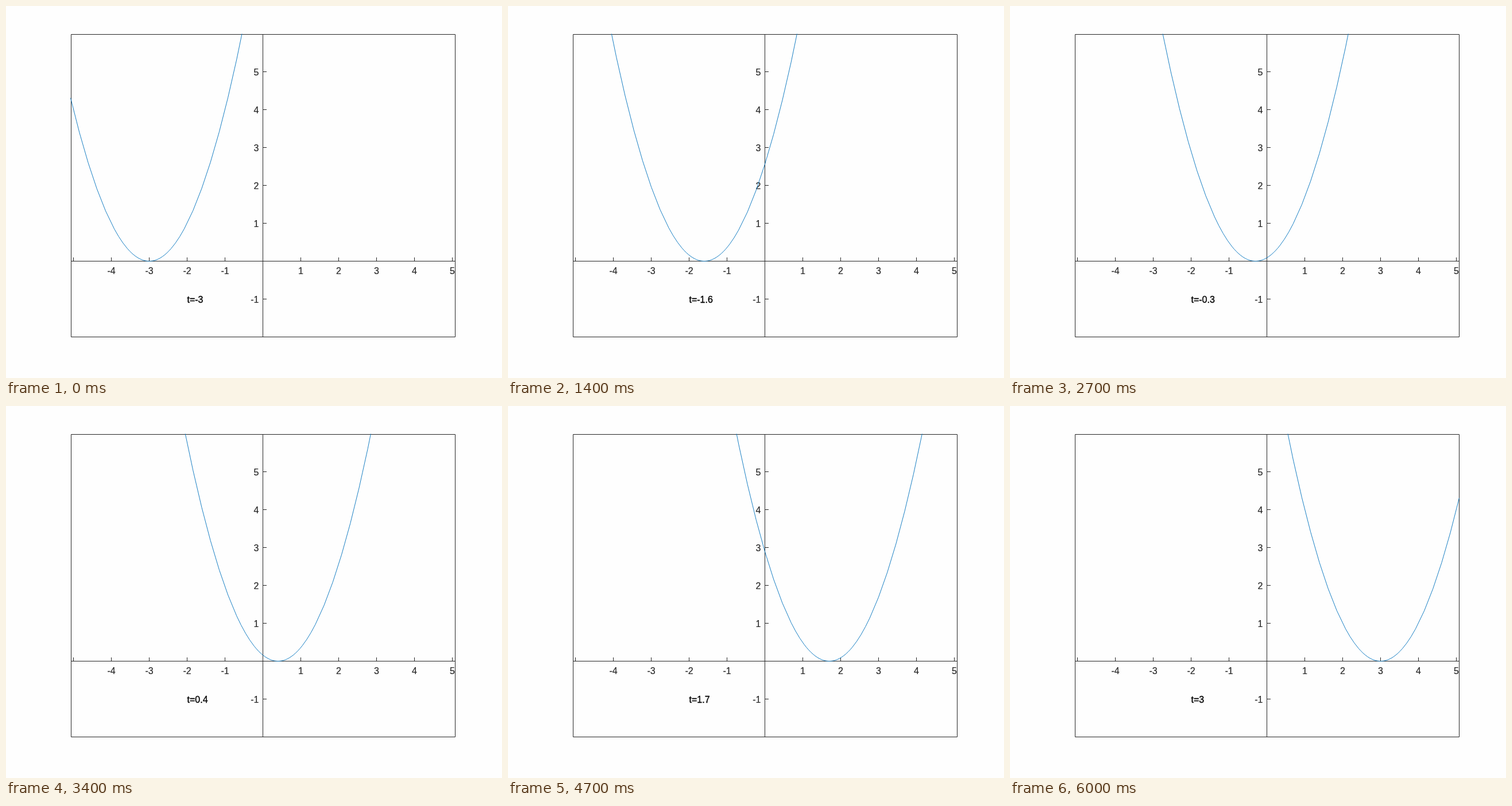
An HTML page that plays this animation: 864 by 648 pixels, repeating every 6.1 s.

```html
<!DOCTYPE html>
<html lang="en">
<head>
<meta charset="utf-8">
<title>Sliding parabola</title>
<style>
  html, body { margin: 0; width: 100%; height: 100%; overflow: hidden; background: #fefefe; }
  svg { display: block; }
  text { font: 16px "Liberation Sans", Arial, sans-serif; fill: #262626; stroke: #262626; stroke-width: 0.2; }
  #axes { fill: none; stroke: #262626; stroke-width: 1; }
  #curve { fill: none; stroke: #0072bd; stroke-width: 0.9; stroke-linejoin: round; }
  #label { fill: #000; stroke: #000; stroke-width: 0.35; }
</style>
</head>
<body>
<svg width="864" height="648" viewBox="0 0 864 648">
  <clipPath id="plot"><rect x="112" y="48.5" width="671" height="528"/></clipPath>
  <path id="axes"/>
  <g id="numbers"></g>
  <path id="curve" clip-path="url(#plot)"/>
  <text id="label" x="315.5" y="517"></text>
</svg>
<script>
const STEP = 100, STEPS = 61, UNIT = 66;
const LEFT = 113.5, RIGHT = 782.5, TOP = 49.5, BOTTOM = 576.5;
const HELD = [3, 8, 31];            // steps that repeat the one before
const REACH = 5.075;                // curve is sampled for |x| <= REACH
const CELLS = 44, MAX_TURN = 0.09;  // sampling grid and bend limit in radians
const $ = id => document.getElementById(id);
const px = x => 447.5 + x * UNIT;
const py = y => 444.5 - y * UNIT;

function addNumber(text, x, y, anchor) {
  const el = document.createElementNS("http://www.w3.org/2000/svg", "text");
  el.setAttribute("x", x);
  el.setAttribute("y", y);
  el.setAttribute("text-anchor", anchor);
  el.textContent = text;
  $("numbers").append(el);
}

function drawAxes() {
  let d = `M${LEFT} ${TOP}H${RIGHT}V${BOTTOM}H${LEFT}Z` +
          `M${LEFT} ${py(0)}H${RIGHT}M${px(0)} ${TOP}V${BOTTOM}`;
  for (let x = -5; x <= 5; x++) {
    if (!x) continue;
    d += `M${px(x)} ${py(0)}v-6.5`;
    if (x > -5) addNumber(x, px(x), 467, "middle");
  }
  for (let y = -1; y <= 5; y++) {
    if (!y) continue;
    d += `M${px(0)} ${py(y)}h6.5`;
    addNumber(y, 440.5, py(y) + 6.5, "end");
  }
  $("axes").setAttribute("d", d);
}

function curvePath(t) {
  const points = [];
  const angle = x => Math.atan(2 * (x - t));
  const grid = i => REACH * (2 * i / CELLS - 1);
  const add = x => points.push(px(x).toFixed(2) + " " + py((x - t) ** 2).toFixed(2));
  const split = (a, b) => {
    if (angle(b) - angle(a) > MAX_TURN) {
      const mid = (a + b) / 2;
      split(a, mid);
      split(mid, b);
    } else add(b);
  };
  add(-REACH);
  for (let i = 0; i < CELLS; i++) split(grid(i), grid(i + 1));
  return "M" + points.join("L");
}

let shown = -1;
function render() {
  let step = Math.floor(performance.now() / STEP) % STEPS;
  if (HELD.includes(step)) step--;
  if (step !== shown) {
    shown = step;
    const t = (step - 30) / 10;
    $("curve").setAttribute("d", curvePath(t));
    $("label").textContent = "t=" + t;
  }
  requestAnimationFrame(render);
}

drawAxes();
render();
</script>
</body>
</html>
```
